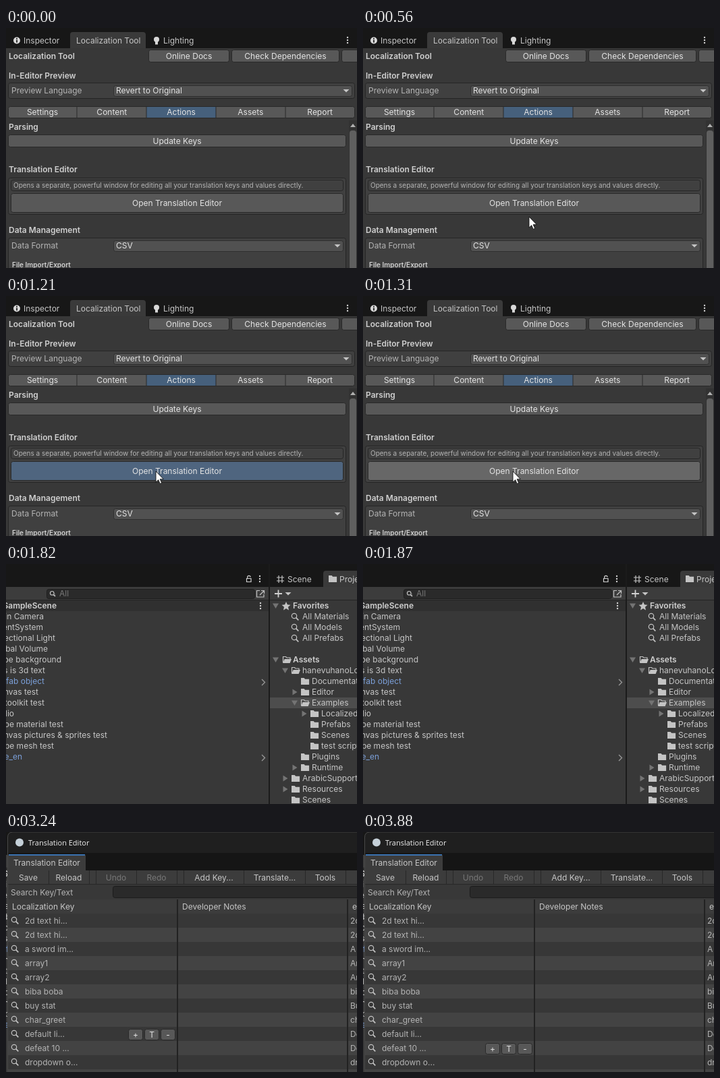
These frames come from a looping animation (520 px wide and 356 px high, 3.93 s). An HTML page:

```html
<!DOCTYPE html>
<html lang="en">
<head>
<meta charset="utf-8">
<title>Translation editor walkthrough</title>
<style>
html, body { margin: 0; width: 100%; height: 100%; overflow: hidden; background: #383838; }
svg { display: block; width: 520px; height: 356px; }
text { font: 12px Inter, "Noto Sans", sans-serif; fill: #c6c6c6; white-space: pre; }
.b { font-weight: 600; fill: #d0d0d0; }
.s { font-size: 10px; }
.w { fill: #e4e4e4; }
.dim { fill: #777; }
.lab { fill: #b4b4b4; }
.blue { fill: #7b9fd8; }
.cap { font: 11px "Open Sans", "Noto Sans", sans-serif; fill: #f0f0f0; }

#tool, #scene, #blank, #editor, #cursor, #tools, #openBtn rect {
  animation: 3930ms step-end infinite;
}
#tool { animation-name: tool; }
#scene { animation-name: scene; }
#blank { animation-name: blank; }
#editor { animation-name: editor; }
#cursor { animation-name: cursor; }
#tools { animation-name: tools; }
#openBtn rect { animation-name: press; }

@keyframes tool { 0% { visibility: visible } 46.31%, 100% { visibility: hidden } }
@keyframes scene { 0% { visibility: hidden } 46.31%, 100% { visibility: visible } }
@keyframes blank { 0% { visibility: hidden } 66.921% { visibility: visible } 68.193%, 100% { visibility: hidden } }
@keyframes editor { 0% { visibility: hidden } 68.193%, 100% { visibility: visible } }
@keyframes press {
  0% { fill: #585858 }
  15.267% { fill: #676767 }
  30.788% { fill: #4f657f }
  33.333%, 100% { fill: #676767 }
}
@keyframes cursor {
  0% { transform: translate(560px, 380px) }
  11.195% { transform: translate(298px, 339px) }
  12.468% { transform: translate(270px, 306px) }
  13.994% { transform: translate(246px, 280px) }
  15.267% { transform: translate(231px, 264px) }
  16.539% { transform: translate(224px, 257px) }
  18.066% { transform: translate(222px, 257px) }
  19.338% { transform: translate(222px, 259px) }
  24.427%, 100% { transform: translate(222px, 260px) }
}
@keyframes tools {
  0% { visibility: hidden; transform: none }
  82.442% { visibility: visible; transform: none }
  98.727%, 100% { visibility: visible; transform: translateY(21px) }
}
</style>
</head>
<body>
<svg viewBox="0 0 520 356">
  <g id="tool"></g>
  <g id="scene"></g>
  <g id="blank"></g>
  <g id="editor"></g>
</svg>
<script>
const text = (x, y, s, cls = '', anchor = 'start') =>
  `<text x="${x}" y="${y}" class="${cls}" text-anchor="${anchor}">${s}</text>`;
const mid = (x, y, s, cls = 'w') => text(x, y, s, cls, 'middle');
const rect = (x, y, w, h, fill) =>
  `<rect x="${x}" y="${y}" width="${w}" height="${h}" fill="${fill}"/>`;
const frame = (x, y, w, h, fill, line, r = 3) =>
  `<rect x="${x + .5}" y="${y + .5}" width="${w - 1}" height="${h - 1}" rx="${r}" fill="${fill}" stroke="${line}"/>`;
const fill = (d, c = '#c4c4c4') => `<path d="${d}" fill="${c}"/>`;
const line = (d, c = '#c4c4c4', w = 1.3) =>
  `<path d="${d}" fill="none" stroke="${c}" stroke-width="${w}"/>`;
const disc = (x, y, r, c) => `<circle cx="${x}" cy="${y}" r="${r}" fill="${c}"/>`;

const button = (x, y, w, h, label) =>
  frame(x, y, w, h, '#585858', '#292929') + mid(x + w / 2, y + h / 2 + 4.5, label);
const box = (x, y, w, h) => frame(x, y, w, h, '#404040', '#252525');
const caret = (x, y, c = '#c4c4c4') => fill(`M${x - 4.5} ${y - 2}h9l-4.5 4.5z`, c);
const dropdown = (x, y, w, label) =>
  frame(x, y, w, 17, '#515151', '#2f2f2f') + text(x + 4, y + 12, label, 'w') + caret(x + w - 9, y + 8);
const dots = (x, y) => [-4, 0, 4].map(d => disc(x, y + d, 1.2, '#d0d0d0')).join('');
const lens = (x, y, k = 1) =>
  `<circle cx="${x - k}" cy="${y - k}" r="${3.7 * k}" fill="none" stroke="#c4c4c4" stroke-width="1.2"/>` +
  line(`M${x + 1.7 * k} ${y + 1.7 * k}l${3.6 * k} ${3.6 * k}`, '#c4c4c4', 1.7);
const fold = (x, y, open) =>
  fill(open ? `M${x - 4.5} ${y - 3.5}h9l-4.5 7.5z` : `M${x - 3} ${y - 4.5}v9l7 -4.5z`, '#747474');
const folder = (x, y, open) => open
  ? line(`M${x - 5.5} ${y + 4}v-8.5h4l1.5 1.5h5v2.5`, '#c4c4c4', 1.2) +
    fill(`M${x - 6} ${y + 5}l2.6 -6h10.4l-2.4 6z`)
  : fill(`M${x - 6} ${y + 5}v-10h4.6l1.5 1.8h6v8.2z`);

function toolPanel() {
  const tabs = ['Settings', 'Content', 'Actions', 'Assets', 'Report'];
  return rect(0, 0, 520, 356, '#383838') + rect(0, 0, 520, 30, '#171717') +
    fill('M95 30V10q0 -4 4 -4h104q4 0 4 4v20z', '#3a3a3a') +
    disc(16, 18.5, 5, '#d8d8d8') + rect(15.2, 17.6, 1.7, 4, '#171717') + disc(16, 15.8, 1, '#171717') +
    text(26, 23, 'Inspector') + text(104, 23, 'Localization Tool') +
    disc(223, 17, 4, '#d8d8d8') + rect(221, 20, 4, 4.5, '#d8d8d8') +
    text(233, 23, 'Lighting') + dots(506, 18) +
    text(4, 46, 'Localization Tool', 'b') +
    button(211, 32, 120, 19, 'Online Docs') + button(334, 32, 160, 19, 'Check Dependencies') +
    button(497, 32, 90, 19, '') +
    text(4, 75, 'In-Editor Preview', 'b') + box(3, 81, 514, 24) +
    text(8, 97, 'Preview Language', 'lab') + dropdown(159, 85, 354, 'Revert to Original') +
    frame(3, 116, 514, 18, '#585858', '#292929') + rect(208, 117, 103, 16, '#46607c') +
    [105, 208, 311, 414].map(x => rect(x - .5, 117, 1, 16, '#292929')).join('') +
    tabs.map((s, i) => mid(54 + i * 102.8, 129, s)).join('') +
    text(4, 151, 'Parsing', 'b') + button(3, 158, 501, 19, 'Update Keys') +
    rect(508, 137, 12, 219, '#323232') + fill('M510 147h8l-4 -5z', '#b0b0b0') +
    `<rect x="509" y="152" width="10" height="220" rx="4" fill="#5f5f5f"/>` +
    text(4, 214, 'Translation Editor', 'b') + box(3, 222, 501, 55) + box(7, 225, 493, 17) +
    text(11, 237, 'Opens a separate, powerful window for editing all your translation keys and values directly.', 's lab') +
    `<g id="openBtn">${button(7, 245, 493, 29, 'Open Translation Editor')}</g>` +
    text(4, 304, 'Data Management', 'b') + box(3, 311, 501, 60) +
    text(8, 327, 'Data Format', 'lab') + dropdown(159, 315, 341, 'CSV') +
    text(9, 355, 'File Import/Export', 'b s') +
    `<g id="cursor"><path d="M0 0V16.2L3.7 12.7 6.2 18.4 8.7 17.3 6.2 11.7H11.3Z" fill="#fff" stroke="#111" stroke-width=".9"/></g>`;
}

function scenePanels() {
  // Label and right edge; rows run off the left side.
  const objects = [
    ['Main Camera', 56], ['EventSystem', 55], ['Directional Light', 73], ['Global Volume', 62],
    ['cube background', 82], ['this is 3d text', 58], ['prefab object', 57, 'blue'], ['canvas test', 48],
    ['ui toolkit test', 57], ['audio', 12], ['cube material test', 85],
    ['canvas pictures &amp; sprites test', 150], ['cube mesh test', 71], ['cube_en', 24, 'blue']
  ];
  // Row, label, depth, fold: 0 none, 1 closed, 2 open.
  const tree = [
    [6, 'hanevuhanoLocalization', 1, 2], [7, 'Documentation', 2, 0], [8, 'Editor', 2, 1],
    [9, 'Examples', 2, 2], [10, 'LocalizedAssets', 3, 1], [11, 'Prefabs', 3, 0], [12, 'Scenes', 3, 0],
    [13, 'test scripts', 3, 0], [14, 'Plugins', 2, 0], [15, 'Runtime', 2, 1],
    [16, 'ArabicSupport', 1, 1], [17, 'Resources', 1, 1], [18, 'Scenes', 1, 0]
  ];
  let s = rect(0, 0, 520, 356, '#383838') + rect(0, 0, 520, 34, '#171717') +
    rect(0, 34, 520, 20, '#3c3c3c') + rect(0, 53, 520, 1, '#242424') + rect(0, 54, 389, 16, '#303030') +
    line('M356.5 21.5h6.5v5h-6.5zM357.7 21v-1.5a2.2 2.2 0 0 1 4.4 0', '#d0d0d0', 1.2) + dots(376, 22) +
    frame(60, 37, 309, 15, '#2a2a2a', '#1e1e1e') + lens(69, 44, .75) + caret(74, 46, '#777').replace('h9l-4.5 4.5', 'h4l-2 2') +
    text(79, 48, 'All', 'dim') +
    line('M376 39.5h-4.5v9.500h10.500v-4', '#c4c4c4', 1.2) + line('M378 39.500h4.500v4.500M382 40l-6 6', '#c4c4c4', 1.2) +
    text(75, 66, 'SampleScene', 'b', 'end') + dots(377, 62);
  objects.forEach(([label, x, cls], i) => {
    const y = 78 + i * 16;
    s += text(x, y + 4, label, cls, 'end');
    if (cls) s += line(`M379 ${y - 3}l4.500 4.500l-4.500 4.500`, '#9a9a9a');
  });
  s += rect(389, 0, 2, 356, '#1b1b1b') + rect(391, 198, 129, 16, '#4d4d4d') +
    line('M404 17v11M409 17v11M401 20h11M401 25h11', '#c4c4c4', 1.2) + text(417, 27, 'Scene') +
    fill('M470 34V14q0 -4 4 -4h60v24z', '#3a3a3a') + folder(484, 22) + text(494, 27, 'Project') +
    line('M398 44h11M403.500 38.500v11', '#d0d0d0', 1.8) + caret(418, 44) +
    fold(399.5, 62, 2) + fill('M415 56l1.900 4.300 4.600 .500 -3.500 3 1 4.600 -4 -2.400 -4 2.400 1 -4.600 -3.500 -3 4.600 -.500z') +
    text(425, 66, 'Favorites', 'b') +
    ['Materials', 'Models', 'Prefabs'].map((n, i) => lens(428, 78 + i * 16) + text(439, 82 + i * 16, 'All ' + n)).join('') +
    fold(399.5, 142, 2) + folder(416, 142, true) + text(425, 146, 'Assets', 'b');
  for (const [row, label, depth, state] of tree) {
    const x = 425 + depth * 14, y = 62 + row * 16;
    if (state) s += fold(x - 25.5, y, state === 2);
    s += folder(x - 10, y, state === 2) + text(x, y + 4, label);
  }
  return s;
}

const windowFrame = caption =>
  `<path d="M2.500 360V8q0 -8 8 -8H524V360z" fill="${caption}" stroke="#484848"/>` +
  disc(20, 15.5, 6, '#c5d0d8') +
  rect(3, 31, 517, 26, '#151515') + rect(3, 57, 517, 299, '#383838') +
  fill('M3 57V36q0 -3 3 -3h109q3 0 3 3v21z', '#3c3c3c') + rect(4, 33, 113, 2, '#3a72b0') +
  text(11, 50, 'Translation Editor');

function editorWindow() {
  const bar = [['Save', 33], ['Reload', 93], ['Undo', 163, 'dim'], ['Redo', 223, 'dim'],
    ['Add Key...', 308], ['Translate...', 398], ['Tools', 473]];
  const rows = [
    ['2d text hi...', '2d text'], ['2d text hi...', '2d text'], ['a sword im...', 'A sword'],
    ['array1', 'Array'], ['array2', 'Array'], ['biba boba', 'biba'], ['buy stat', 'Buy'],
    ['char_greet', 'char'], ['default li...', 'Default'], ['defeat 10 ...', 'Defeat'], ['dropdown o...', 'dropdown']
  ];
  let s = windowFrame('#1f1f1f') + text(33, 20, 'Translation Editor', 'cap') +
    rect(3, 57, 517, 21, '#3c3c3c') + rect(3, 77, 517, 1, '#282828') +
    [63, 123, 133, 193, 253, 263, 352, 443, 503].map(x => rect(x, 57, 1, 20, '#282828')).join('') +
    bar.map(([label, x, cls]) => mid(x, 72, label, cls || '')).join('') +
    text(7, 94, 'Search Key/Text', 'lab') + frame(158, 80, 380, 18, '#2a2a2a', '#1c1c1c') +
    rect(3, 100, 517, 21, '#3c3c3c') + text(9, 115, 'Localization Key') +
    text(261, 115, 'Developer Notes') + text(513, 115, 'en') + rect(3, 352, 517, 4, '#434343');
  rows.forEach(([key, value], i) => {
    const y = 121 + i * 21;
    s += rect(3, y, 517, 21, i % 2 ? '#434343' : '#373737') +
      lens(13, y + 10) + text(28, y + 15, key, 'lab') + text(510, y + 15, value, 'lab');
  });
  s += rect(253, 100, 2, 256, '#222') + rect(505, 100, 2, 256, '#222') + '<g id="tools">';
  ['+', 'T', '-'].forEach((c, i) => s += button(181 + i * 24, 292, 22, 17, c));
  return s + '</g>';
}

const put = (id, html) => document.getElementById(id).innerHTML = html;
put('tool', toolPanel());
put('scene', scenePanels());
put('blank', windowFrame('#282828'));
put('editor', editorWindow());
</script>
</body>
</html>
```
